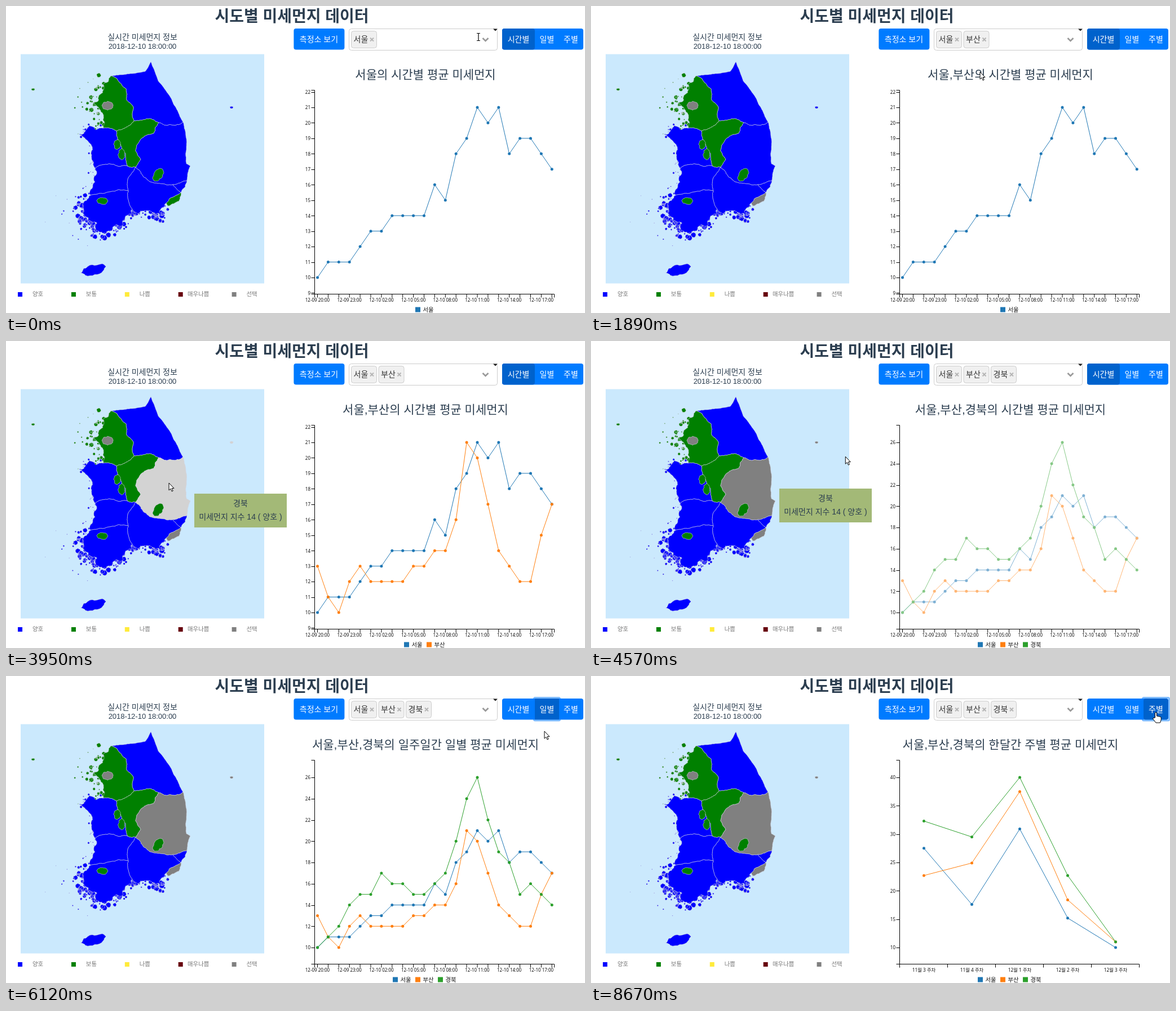
Animation of 1027 by 545 pixels, one loop 9070 ms. Source, as an HTML page:

```html
<!DOCTYPE html>
<html lang="ko">
<head>
<meta charset="utf-8">
<title>시도별 미세먼지 데이터</title>
<style>
html, body { margin: 0; width: 100%; height: 100%; overflow: hidden; background: #fff; }
svg { display: block; width: 100%; height: 100%; font-family: "Liberation Sans", "Noto Sans CJK KR", sans-serif; }
#chart { font-family: "Noto Sans", "Noto Sans CJK KR", sans-serif; }
</style>
</head>
<body>
<svg viewBox="0 0 1027 545">
  <g id="base"></g><g id="map"></g><g id="tip"></g>
  <g id="chart"><g id="axes"></g><g id="lines"></g></g>
  <g id="head"></g><g id="list"></g><g id="cursor"></g>
</svg>
<script>
const LOOP = 9070, INK = '#2c3e50', BLUE = '#007bff', DARK = '#0062cc', GRAY = '#808080';
const SEA = '#0000ff', LAND = '#008000';
const OPEN = 780, PICK = 1790, HOVER = 3810, CLICK = 4110, DAILY = 5700, WEEKLY = 8070;
const layer = {};
document.querySelectorAll('g').forEach(g => layer[g.id] = g);

// Markup helpers
const rect = (x, y, w, h, fill, extra = '') =>
  `<rect x="${x}" y="${y}" width="${w}" height="${h}" fill="${fill}" ${extra}/>`;
const path = (d, stroke, width = 1, fill = 'none', extra = '') =>
  `<path d="${d}" stroke="${stroke}" stroke-width="${width}" fill="${fill}" ${extra}/>`;
const text = (x, mid, str, size, fill = INK, anchor = 'middle', extra = '') =>
  `<text x="${x}" y="${mid + size * .36}" font-size="${size}" fill="${fill}" text-anchor="${anchor}" ${extra}>${str}</text>`;
function paint(node, html) {
  if (node.last !== html) node.innerHTML = node.last = html;
}
const clamp = v => Math.max(0, Math.min(1, v));
const latest = (steps, t) => steps.filter(s => s[0] <= t).pop();
const range = n => [...Array(n).keys()];

// Map: a few key points per border, roughened by midpoint displacement
let seed = 7;
const rnd = () => (seed = seed * 16807 % 2147483647) / 2147483647;
const spread = r => (rnd() * 2 - 1) * r;
const pairs = s => s.split(' ').map(p => p.split(',').map(Number));
const poly = pts => 'M' + pts.map(p => p.map(v => v.toFixed(1)).join(' ')).join('L') + 'Z';
function rough(pts, amp, depth = 4) {
  if (!depth) return pts;
  const out = [pts[0]];
  for (let i = 1; i < pts.length; i++) {
    const [a, b] = pts[i - 1], [c, d] = pts[i], k = spread(amp);
    out.push([(a + c) / 2 + (b - d) * k, (b + d) / 2 + (c - a) * k], pts[i]);
  }
  return rough(out, amp, depth - 1);
}
function blob(x, y, rx, ry = rx, tilt = 0) {
  const pts = range(9).map(i => {
    const u = rx * Math.cos(i * Math.PI / 4), v = ry * Math.sin(i * Math.PI / 4);
    return [x + u * Math.cos(tilt) - v * Math.sin(tilt), y + u * Math.sin(tilt) + v * Math.cos(tilt)];
  });
  return poly(rough(pts, .16, 2));
}

// Arcs shared by neighbours; a lower-case letter walks one backwards
const arcs = {
  A: '187,124 204,138 213,147 214,167 226,180 224,196 227,204',
  B: '227,204 250,200 271,207',
  C: '271,207 285,212 314,206',
  D: '187,124 205,122 247,116 257,99 270,133 294,166 314,206',
  E: '227,204 196,222',
  F: '196,222 172,217',
  G: '172,217 168,187 156,172 172,139 187,124',
  H: '196,222 198,236 212,262 215,284',
  J: '215,284 230,286',
  K: '230,286 239,272 230,257 238,238 262,226 271,207',
  L: '215,284 183,280 158,288',
  M: '158,288 153,250 134,230 147,213 172,217',
  O: '230,286 216,308 217,328',
  P: '217,328 184,330 150,336',
  Q: '150,336 158,288',
  R: '230,286 250,308 296,317',
  S: '296,317 321,310',
  T: '314,206 320,250 320,280 327,284 321,310',
  U: '296,317 310,331',
  V: '321,310 310,331',
  W: '310,331 290,342 284,350',
  I: '310,331 307,346 288,355 284,350',
  X: '284,350 276,372 246,363 224,361',
  Y: '217,328 224,361',
  Z: '224,361 208,388 166,402 146,376 150,336'
};
const roughness = { X: .3, Z: .28, G: .2, M: .2, Q: .25, D: .04, T: .06 };
for (const k in arcs) arcs[k] = rough(pairs(arcs[k]), roughness[k] || .11);
const region = ids => poly([...ids].flatMap(c => arcs[c] || [...arcs[c.toUpperCase()]].reverse()));

// Islets strewn along a coast, pushed seaward by (dx, dy)
const scatter = (arc, n, far, size, dx, dy) => range(n).map(() => {
  const [x, y] = arcs[arc][Math.floor(rnd() * arcs[arc].length)];
  return blob(x + dx + spread(far), y + dy + spread(far), size * (.25 + .75 * rnd() ** 2));
}).join('');

const shapes = [
  [scatter('Z', 110, 13, 5, -6, 4) + scatter('X', 40, 8, 5, 0, 4) + scatter('M', 30, 5, 2.5, -2, 0) +
    scatter('Q', 12, 7, 1.8, -8, 0) + scatter('Z', 12, 25, 1.5, -50, 10), SEA],
  [scatter('G', 45, 10, 4, -9, 0) + scatter('G', 8, 12, 1.5, -35, 5) + blob(48, 148, 3, 2), LAND],
  [region('Dcba'), SEA], [region('AEFG'), LAND], [region('Bkjhe'), LAND], [region('HLMf'), SEA],
  [region('JOPQl'), SEA], [region('CTsrK') + blob(400, 180, 3, 2), SEA, 'gb'],
  [region('SVu'), SEA], [region('RUWXyo'), SEA], [region('YZp'), SEA], [region('wI'), LAND, 'bs'],
  [blob(180, 177, 10, 8), GRAY],
  [blob(197, 246, 6, 9) + blob(205, 263, 6, 10) + blob(270, 300, 8, 13, .6) + blob(171, 346, 10, 6), LAND],
  [blob(155, 468, 23, 9, -.25), SEA]
];
function drawMap(t) {
  const fills = { bs: t >= PICK && GRAY, gb: t >= CLICK ? GRAY : t >= HOVER && '#d3d3d3' };
  return shapes.map(([d, fill, id]) => path(d, '#d3d3e0', .6, fills[id] || fill, 'stroke-linejoin="round"')).join('');
}

// Chart
const names = ['서울', '부산', '경북'], hues = ['#1f77b4', '#ff7f0e', '#2ca02c'];
const hourly = [
  [10, 11, 11, 11, 12, 13, 13, 14, 14, 14, 14, 16, 15, 18, 19, 21, 20, 21, 18, 19, 19, 18, 17],
  [13, 11, 10, 12, 13, 12, 12, 12, 12, 13, 13, 14, 14, 16, 21, 20, 17, 14, 13, 12, 12, 15, 17],
  [10, 11, 12, 14, 15, 15, 17, 16, 16, 15, 15, 16, 17, 20, 24, 26, 22, 19, 18, 15, 16, 15, 14]
];
const daily = names.map((_, k) => range(7).map(i => Math.round(16 + 3 * k + (6 + k) * Math.cos(i * .8))));
const weekly = [[27.5, 17.6, 30.9, 15.2, 10], [22.7, 24.9, 37.5, 18.4, 11], [32.3, 29.5, 40, 22.7, 11]];
const days = range(7).map(i => `12월 ${i + 4}일`);
const weeks = ['11월 3', '11월 4', '12월 1', '12월 2', '12월 3'].map(s => s + ' 주차');
const scenes = [
  [-LOOP, hourly.slice(0, 1)], [2240, hourly.slice(0, 2)], [4440, hourly], [6420, daily, days], [8440, weekly, weeks]
];
function tickStep(span) {
  const base = 10 ** Math.floor(Math.log10(span / 10)), err = 10 * base / span;
  return base * (err <= .15 ? 10 : err <= .35 ? 5 : err <= .75 ? 2 : 1);
}
function drawChart([, data, cats]) {
  const all = data.flat(), lo = Math.min(...all), unit = 302 / (Math.max(...all) - lo);
  const py = v => 482 - unit * (v - lo);
  const n = data[0].length, band = 425 / n;
  const px = i => cats ? 548 + band * (i + .5) : 552.5 + 18.9 * i;
  const step = tickStep(362 / unit), bottom = lo - 30 / unit, top = lo + 332 / unit;
  let marks = 'M541.5 149.5H547.5V511.5H541.5M547.5 517.5V511.5H972.5V517.5', labels = '', lines = '';
  for (let v = Math.ceil(bottom / step) * step; v <= top; v += step) {
    marks += `M541.5 ${Math.round(py(v)) + .5}h6`;
    labels += text(540, py(v) + .5, v, 8, '#111', 'end');
  }
  for (const i of range(n)) {
    const hour = 20 + i;
    marks += `M${cats ? 547.5 + band * i : px(i)} 511.5v6`;
    if (cats) labels += text(px(i), 522.5, cats[i], 8.3, '#111');
    else if (i % 3 === 0)
      labels += text(px(i), 522.5, `12-${hour < 24 ? '09' : '10'} ${String(hour % 24).padStart(2, 0)}:00`, 8, '#111');
  }
  data.forEach((row, k) => {
    const x = 726 - 20 * (data.length - 1) + 40 * k;
    labels += rect(x, 534.5, 9, 9, hues[k]) + text(x + 13.5, 539.5, names[k], 10.3, '#111', 'start');
    lines += path('M' + row.map((v, i) => px(i) + ' ' + py(v)).join('L'), hues[k]) +
      row.map((v, i) => `<circle cx="${px(i)}" cy="${py(v)}" r="2.5" fill="${hues[k]}"/>`).join('');
  });
  return { axes: path(marks, '#000') + labels, lines };
}
scenes.forEach(s => s.art = drawChart(s));

// Header controls
const tabs = [['시간별', 880, 58], ['일별', 938, 43], ['주별', 980, 44]];
const spans = ['시간별', '일주일간 일별', '한달간 주별'];

function drawHead(t) {
  const chosen = names.slice(0, t < PICK ? 1 : t < CLICK ? 2 : 3);
  const active = t < DAILY ? 0 : t < WEEKLY ? 1 : 2;
  let s = text(744, 121, `${chosen}의 ${spans[active]} 평균 미세먼지`, 21);
  chosen.forEach((name, i) => {
    const x = 612.5 + 48.5 * i;
    s += rect(x, 44.5, 45, 30, '#f0f0f0', 'rx="4" stroke="#ccc"') + text(x + 4, 59, name, 14, '#333', 'start') +
      path(`M${x + 33.5} 56.5l6 6m0-6l-6 6`, '#b5b5b5', 2);
  });
  s += t >= OPEN && t < PICK
    ? path('M666 52.5V66.5', '#333') + path('M845.5 60.5l5-5 5 5', '#999', 2.6)
    : path('M845.5 57l5 5 5-5', '#999', 2.6);
  const [, ax, aw] = tabs[active];
  s += rect(880, 40, 144, 37.4, BLUE, 'rx="4"') + rect(ax, 40, aw, 37.4, DARK, active === 1 ? '' : 'rx="4"');
  if (active) s += rect(ax - 1.5, 38.5, aw + 3, 40.4, 'none', 'rx="2" stroke="#007bff" stroke-opacity=".5" stroke-width="3"');
  tabs.forEach(([name, x, w]) => s += text(x + w / 2, 58.5, name, 14, '#fff'));
  return s;
}

const cities = '서울 부산 대구 인천 광주 대전 울산 경기 강원 충북 충남 전북 전남 경북'.split(' ');
function drawList(y) {
  const pitch = 22.85, pick = y > 106 ? 1 : 0;
  return rect(609, 80, 263, 327, '#000', 'opacity=".1" rx="3"') + rect(608.5, 78.5, 263, 326, '#fff', 'stroke="#ccc"') +
    rect(609, 83 + pitch * pick, 249, 23, '#5897fb') +
    cities.map((c, i) => text(625.5, 94 + pitch * i, c, 14, i === pick ? '#fff' : '#333', 'start')).join('') +
    rect(858, 79, 13, 325, '#f1f1f1') + rect(859, 93, 11, 244, '#c1c1c1') +
    path('M861 88l3.5-4 3.5 4z', 'none', 0, '#a3a3a3') + path('M861 395l3.5 4 3.5-4z', 'none', 0, '#505050');
}

// Pointer stops: arrival, departure, x, y
const stops = [
  [0, 90, 838, 55], [600, 1010, 846, 58], [1640, 2240, 690, 117], [2640, 3110, 758, 71],
  [3950, 3950, 289, 252], [4030, 4130, 289, 243], [4720, 4900, 482, 198], [5270, 5450, 1012, 92],
  [5650, 5850, 960, 60], [6120, 6120, 955, 98], [6350, 6700, 955, 152], [7350, LOOP, 1002, 65]
];
function pointer(t) {
  const i = Math.max(1, stops.findIndex(s => s[1] > t)), [, leave, x0, y0] = stops[i - 1], [arrive, , x1, y1] = stops[i];
  const k = clamp((t - leave) / (arrive - leave)), e = k * k * (3 - 2 * k);
  return [x0 + (x1 - x0) * e, y0 + (y1 - y0) * e];
}
function drawCursor(x, y) {
  const bar = y > 40 && y < 78;
  const shape = bar && x > 880
    ? path('M-1.5 9V1q0-1.5 1.5-1.5T1.5 1V6l6 1.2q1.7.4 1.7 2V13l-1.7 5H0L-5 11.5q-1-2 1-2.2z', '#000', 1, '#fff')
    : bar && x > 608 && x < 872
      ? path('M-3-6.5H3M0-6.5V6.5M-3 6.5H3', '#000', 1.2)
      : path('M0 0V13l3-2.7 2.2 4.7 2-1-2.1-4.5H9z', '#000', 1, '#fff');
  return `<g transform="translate(${x.toFixed(1)} ${y.toFixed(1)})">${shape}</g>`;
}
function drawTip(t) {
  if (t < HOVER || t > 4690) return '';
  const [px, py] = pointer(Math.min(t, CLICK)), x = px + 45, y = py + 19;
  return rect(x, y, 164, 60, '#a3b977') + text(x + 82, y + 16.5, '경북', 14) +
    text(x + 82, y + 40.5, '미세먼지 지수 14 ( 양호 )', 14);
}

const levels = [['양호', SEA], ['보통', LAND], ['나쁨', '#ffeb3b'], ['매우나쁨', '#67000d'], ['선택', GRAY]];
paint(layer.base,
  text(507, 18, '시도별 미세먼지 데이터', 28, INK, 'middle', 'font-weight="bold"') +
  text(242, 55, '실시간 미세먼지 정보', 14) + text(242, 71, '2018-12-10 18:00:00', 13) +
  rect(26, 85.5, 432, 407, '#cbe9fd') +
  levels.map(([name, c], i) => rect(21 + 94.9 * i, 508, 8, 8, c) + text(56.5 + 94.9 * i, 511.5, name, 10.4, '#777')).join('') +
  rect(510.4, 40, 90, 37.4, BLUE, 'rx="4"') + text(555, 58.5, '측정소 보기', 14, '#fff') +
  rect(608.5, 40.5, 263, 38, '#fff', 'rx="4" stroke="#ccc"') + path('M864 40.5h8l-4 4z', 'none', 0, '#222'));

function render(t) {
  const [x, y] = pointer(t), scene = latest(scenes, t);
  paint(layer.map, drawMap(t));
  paint(layer.tip, drawTip(t));
  paint(layer.axes, scene.art.axes);
  paint(layer.lines, scene.art.lines);
  layer.lines.setAttribute('opacity', clamp((t - scene[0]) / 230));
  paint(layer.head, drawHead(t));
  paint(layer.list, t >= OPEN && t < PICK + 80 ? drawList(y) : '');
  layer.list.setAttribute('opacity', Math.min(clamp((t - OPEN + 40) / 120), clamp((PICK + 80 - t) / 80)));
  paint(layer.cursor, drawCursor(x, y));
}
const start = performance.now();
function frame() {
  render((performance.now() - start) % LOOP);
  requestAnimationFrame(frame);
}
frame();
</script>
</body>
</html>
```
